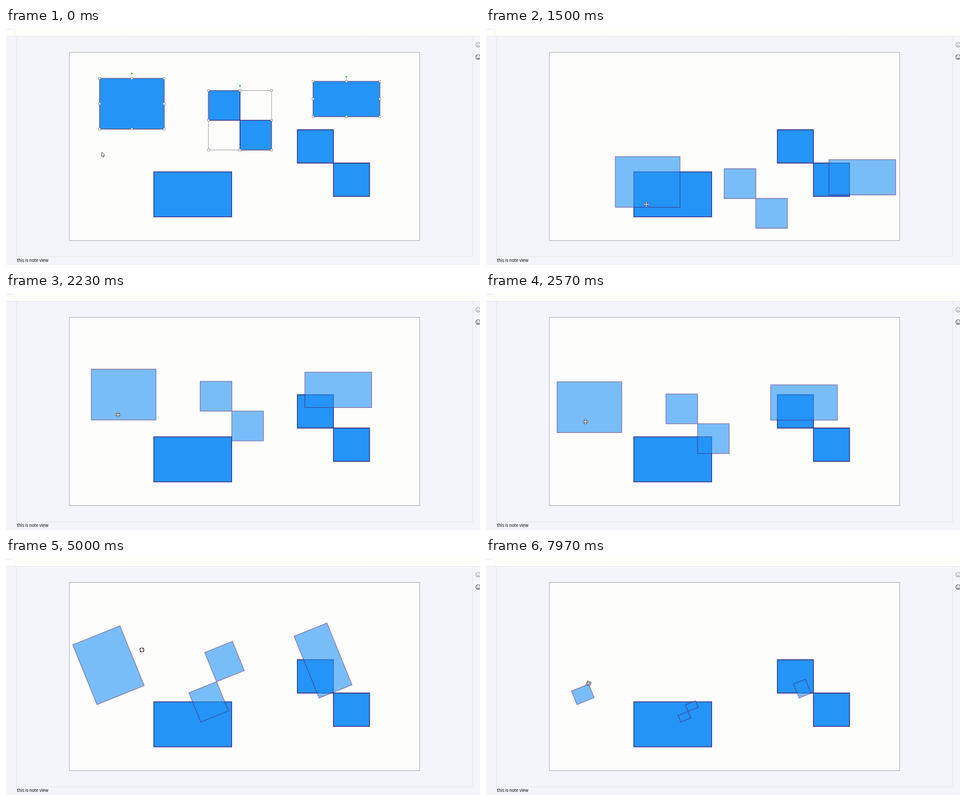
An HTML page with a canvas for the animation above (8 s loop, 1057 by 530 pixels).

```html
<!DOCTYPE html>
<html lang="en">
<head>
<meta charset="utf-8">
<title>Multi-selection editing</title>
<style>
  html, body { margin: 0; width: 100%; height: 100%; overflow: hidden; background: #f3f5fa; }
  canvas { position: absolute; left: 0; top: 0; }
  .note {
    position: absolute; left: 24px; top: 512px; white-space: nowrap; color: #000;
    font: 500 9.55px/15px "Noto Sans CJK SC", "Noto Sans CJK JP", "Noto Sans", sans-serif;
  }
</style>
</head>
<body>
<canvas width="1057" height="530"></canvas>
<div class="note">this is note view</div>
<script>
const view = document.querySelector('canvas').getContext('2d');
const layer = Object.assign(document.createElement('canvas'), { width: 1057, height: 530 }).getContext('2d');
let ctx = view;

const LOOP = 8000, TICK = 100 / 3, RAD = Math.PI / 180;
const FILL = '#2594f7', EDGE = '#3e3285', RULE = '#e5e5dc';

// Parts of a group as unit rectangles [u0, v0, u1, v1]
const whole = [[0, 0, 1, 1]];
const stairs = [[0, 0, .5, .5], [.5, .5, 1, 1]];
const box = (x, y, w, h, parts) => ({ x, y, w, h, parts });

const fixed = [box(329.6, 321.6, 173.6, 100.8, whole), box(649.7, 227.5, 161, 149, stairs)];
const picked = [
  box(208.6, 112.7, 144.1, 113.3, whole),
  box(451.4, 139.8, 140.8, 133, stairs),
  box(684.8, 119.4, 148.8, 78.9, whole)
];

// Drag path: [time, dx, dy]
const path = [
  [870, 0, 0], [1070, 16.2, 20.6], [1670, 105, 236], [1870, 62.5, 161.5],
  [2130, -8, 34], [2500, -46, 122], [2570, -50, 86], [2770, -52.2, 70.4]
];
// Free pointer moves: [start, end, x, y]
const glides = [
  [0, 830, 272, 205], [2800, 3000, 219, 273], [3270, 3400, 214, 193], [3570, 3630, 219, 171.5],
  [3800, 3830, 228, 179.5], [3970, 4070, 228, 171], [5100, 5200, 303, 205.5],
  [5735, 6030, 257, 151], [6140, 6730, 254.5, 152]
];
const pointers = [[0, 'arrow'], [530, 'move'], [3590, 'arrow'], [3820, 'ring'], [5760, 'arrow'], [5960, 'size']];
const stages = [
  [0, 'selected'], [885, 'ghost'], [2990, 'plain'], [3320, 'selected'],
  [3990, 'ghost'], [5760, 'selected'], [6960, 'ghost']
];

const pick = (rows, t) => rows.filter(r => r[0] <= t).pop()[1];
const part = (t, a, b) => Math.min(1, Math.max(0, (t - a) / (b - a)));
const mix = (a, b, u) => a + (b - a) * u;
const smooth = u => u * u * (3 - 2 * u);

function dragAt(t) {
  let x = 0, y = 0;
  for (let i = 1; i < path.length; i++) {
    const [end, px, py] = path[i], u = part(t, path[i - 1][0], end);
    x = mix(x, px, u);
    y = mix(y, py, u);
  }
  return [x, y];
}

function poseAt(t) {
  const [dx, dy] = dragAt(t);
  const shrink = 1 - (1 - part(t, 6930, 7970)) ** 1.35;
  return {
    dx, dy, turn: 68 * RAD * smooth(part(t, 4540, 5000)),
    sx: 1 - .774 * shrink, sy: 1 - .637 * shrink
  };
}

// Stage position of a unit point; resizing keeps the (1,1) corner in place
function spot(g, p, u, v) {
  const x = g.w * (.5 + (u - 1) * p.sx), y = g.h * (.5 + (v - 1) * p.sy);
  const c = Math.cos(p.turn), s = Math.sin(p.turn);
  return [g.x + g.w / 2 + p.dx + x * c - y * s, g.y + g.h / 2 + p.dy + x * s + y * c];
}

function poly(points, fill, stroke, width) {
  ctx.beginPath();
  points.forEach(q => ctx.lineTo(...q));
  ctx.closePath();
  if (fill) { ctx.fillStyle = fill; ctx.fill(); }
  ctx.strokeStyle = stroke;
  ctx.lineWidth = width;
  ctx.stroke();
}

function line(x1, y1, x2, y2, color) {
  ctx.strokeStyle = color;
  ctx.lineWidth = 1;
  ctx.beginPath();
  ctx.moveTo(x1, y1);
  ctx.lineTo(x2, y2);
  ctx.stroke();
}

function dot(x, y, r, fill) {
  ctx.fillStyle = fill;
  ctx.beginPath();
  ctx.arc(x, y, r, 0, 7);
  ctx.fill();
}

function ring(x, y, r, color, width) {
  ctx.strokeStyle = color;
  ctx.lineWidth = width;
  ctx.beginPath();
  ctx.arc(x, y, r, 0, 2 * Math.PI);
  ctx.stroke();
}

const quad = (g, p, [a, b, c, d]) => [[a, b], [c, b], [c, d], [a, d]].map(q => spot(g, p, ...q));
const shape = (g, p) => g.parts.forEach(r => poly(quad(g, p, r), FILL, EDGE, 1.8));

function ghosts(p) {
  ctx = layer;
  ctx.clearRect(0, 0, 1057, 530);
  picked.forEach(g => shape(g, p));
  ctx = view;
  ctx.globalAlpha = .607;
  ctx.drawImage(layer.canvas, 0, 0);
  ctx.globalAlpha = 1;
}

function handles(g, p) {
  poly(quad(g, p, whole[0]), null, '#8b8b92', 1);
  const top = spot(g, p, .5, 0), knob = spot(g, p, .5, -10.6 / g.h);
  line(...top, ...knob, '#b9bdb9');
  dot(...knob, 2, '#22c522');
  for (const u of [0, .5, 1]) for (const v of [0, .5, 1]) {
    if (u === .5 && v === .5) continue;
    ctx.save();
    ctx.translate(...spot(g, p, u, v));
    ctx.rotate(p.turn);
    poly([[-2.2, -2.2], [2.2, -2.2], [2.2, 2.2], [-2.2, 2.2]], '#fff', '#777', .9);
    ctx.restore();
  }
}

function face(y, color, happy) {
  ring(1053, y, 5.3, color, 1.1);
  dot(1051, y - 1.5, .8, color);
  dot(1055, y - 1.5, .8, color);
  ctx.beginPath();
  if (happy) ctx.arc(1053, y + .6, 2.5, .2, Math.PI - .2);
  else ctx.arc(1053, y + 4, 2.5, Math.PI + .3, -.3);
  ctx.stroke();
}

function backdrop() {
  ctx.fillStyle = '#f3f5fa';
  ctx.fillRect(0, 0, 1057, 530);
  ctx.fillStyle = '#fefefb';
  ctx.fillRect(0, 0, 1057, 18);
  line(0, 18.5, 1057, 18.5, RULE);
  line(19.5, 0, 19.5, 18, '#eeeee6');
  line(0, 3.5, 13, 3.5, RULE);
  line(13.5, 0, 13.5, 4, RULE);
  line(5.5, 0, 5.5, 3, RULE);
  line(23.5, 19, 23.5, 512, RULE);
  line(1040.5, 19, 1040.5, 512, RULE);
  line(24, 511.5, 1041, 511.5, RULE);
  ctx.fillStyle = '#fdfdfc';
  ctx.fillRect(141, 54, 782, 421);
  ctx.strokeStyle = '#9a9ca0';
  ctx.lineWidth = 1;
  ctx.strokeRect(141.5, 54.5, 781, 421);
  face(37.5, '#8d9096', false);
  face(65, '#3c3e42', true);
}

const arm = [[0, -6.6], [2.8, -3.6], [1.1, -3.6], [1.1, -1.1], [3.6, -1.1], [3.6, -2.8]];
const cross = [0, 1, 2, 3].flatMap(k => arm.map(([x, y]) =>
  [[x, y], [-y, x], [-x, -y], [y, -x]][k]));
const cursors = {
  arrow: () => poly([[0, 0], [0, 10], [2.3, 8], [3.8, 11.4], [5.4, 10.7], [3.9, 7.4], [6.8, 7.2]], '#fff', '#333', 1),
  move: () => poly(cross, '#fff', '#2c3440', .9),
  size: () => { ctx.rotate(68 * RAD); cursors.move(); },
  ring: () => {
    ring(0, 0, 4.5, '#fff', 4);
    ctx.setLineDash([5.4, 1.67]);
    ring(0, 0, 4.5, '#26292c', 2);
    ctx.setLineDash([]);
  }
};

function pointerAt(t, p) {
  if (t > 850 && t < 3000) {
    // The shapes trail the pointer slightly
    const [dx, dy] = dragAt(t + 40);
    return [272 + dx, 205 + dy];
  }
  if (t > 4540 && t < 5735) {
    const k = p.turn / (68 * RAD), a = 65.4 * RAD * k, r = 69 + 13 * k;
    return [228.4 + r * Math.sin(a), 239.7 - r * Math.cos(a)];
  }
  if (t > 6950) {
    const [x, y] = spot(picked[0], p, 0, 0);
    return [x, y + mix(4, -1.5, part(t, 6970, 7970))];
  }
  return glides.reduce(([x, y], [a, b, gx, gy]) => {
    const u = part(t, a, b);
    return [mix(x, gx, u), mix(y, gy, u)];
  }, [213.5, 277.5]);
}

function draw(t) {
  const p = poseAt(t), stage = pick(stages, t);
  backdrop();
  fixed.forEach(g => shape(g, poseAt(0)));
  if (stage === 'ghost') ghosts(p);
  else picked.forEach(g => shape(g, p));
  if (stage === 'selected') picked.forEach(g => handles(g, p));
  ctx.save();
  ctx.translate(...pointerAt(t, p));
  cursors[pick(pointers, t)]();
  ctx.restore();
}

const start = performance.now();
function frame(now) {
  const t = Math.max(0, now - start) % LOOP;
  const tick = Math.floor((t + 4) / TICK);
  draw(Math.round(tick * TICK / 10) * 10 % LOOP);
  requestAnimationFrame(frame);
}
draw(0);
requestAnimationFrame(frame);
</script>
</body>
</html>
```
